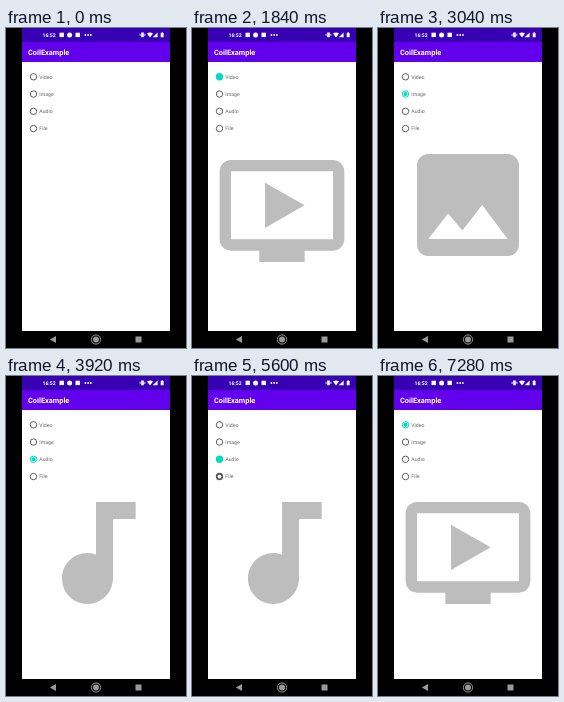
These frames come from a looping animation (180x320 px, 8640 ms). An HTML page:

```html
<!DOCTYPE html>
<html lang="en">
<head>
<meta charset="utf-8">
<title>CoilExample</title>
<style>
  html, body { margin: 0; width: 100%; height: 100%; overflow: hidden; background: #000; }
  svg { display: block; width: 100vw; height: 100vh; }
  text { font-family: Roboto, Arial, sans-serif; text-rendering: geometricPrecision; }
</style>
</head>
<body>
<svg viewBox="0 0 180 320">
  <rect width="180" height="320"/>
  <rect x="16" width="148" height="303" fill="#fff"/>
  <rect x="16" width="148" height="14" fill="#3700b3"/>
  <rect x="16" y="14" width="148" height="20" fill="#6200ee"/>
  <g fill="#fff">
    <text x="36.5" y="8.9" font-size="5.1" font-weight="700">16:52</text>
    <rect x="53.5" y="4.7" width="4.4" height="4.4"/>
    <circle cx="63.6" cy="6.9" r="2.5"/>
    <rect x="69.5" y="4.7" width="4.4" height="4.4"/>
    <circle cx="79.4" cy="7" r=".9"/>
    <circle cx="82.1" cy="7" r=".9"/>
    <circle cx="84.8" cy="7" r=".9"/>
    <path d="M135.2 4.6h2.6v4.6h-2.6zM133.7 5.8h.8v2.2h-.8zM138.5 5.8h.8v2.2h-.8z"/>
    <path d="M141 5.6q3-2.2 6 0l-3 3.8zM151.6 4.4v4.9h-4.9z"/>
    <path d="M154.7 4.9h.8v-.6h1.3v.6h.8v4.4h-2.9z"/>
    <text x="22" y="27.1" font-size="7.4" font-weight="700">CoilExample</text>
  </g>
  <path id="icon" fill="#bdbdbd" fill-rule="evenodd"/>
  <g id="rows"></g>
  <circle id="ripple" cx="27.5" r="6.5" fill="#000" fill-opacity=".08"/>
  <circle id="touch" cx="42" r="4" fill="#fff" fill-opacity=".5" stroke="#777" stroke-opacity=".35" stroke-width=".7"/>
  <g fill="#999">
    <path d="M50 308v7l-6.2-3.5z"/>
    <circle cx="90" cy="311.5" r="4.6" fill="none" stroke="#999" stroke-width="1"/>
    <circle cx="90" cy="311.5" r="3"/>
    <rect x="129.5" y="308.5" width="6" height="6"/>
  </g>
</svg>
<script>
const LOOP = 8640, STEP = 80, TEAL = '#03dac5', GRAY = '#5c5c5c', RADIUS = 3.7;
const labels = ['Video', 'Image', 'Audio', 'File'];
const shapes = [
  'M21 3H3c-1.11 0-2 .89-2 2v12c0 1.1.89 2 2 2h5v2h8v-2h5c1.1 0 2-.9 2-2V5c0-1.11-.9-2-2-2zM21 17H3V5h18zM16 11l-7 4V7z',
  'M21 19V5c0-1.1-.9-2-2-2H5c-1.1 0-2 .9-2 2v14c0 1.1.9 2 2 2h14c1.1 0 2-.9 2-2zM8.5 13.5l2.5 3L14.5 12l4.5 6H5z',
  'M12 3v9.28c-.47-.17-.97-.28-1.5-.28C8 12 6 14 6 16.5S8 21 10.5 21c2.31 0 4.2-1.75 4.45-4H15V6h4V3z',
  'M6 2c-1.1 0-2 .9-2 2v16c0 1.1.9 2 2 2h12c1.1 0 2-.9 2-2V8l-6-6zM13 9V3.5L18.5 9z'
];
// Each tap: press time, settle time, row, vertical shift of the icon
const taps = [
  [1360, 2000, 0, 6], [2560, 3040, 1, 0], [3440, 3920, 2, 0], [4400, 4800, 3, 6],
  [5280, 5760, 2, 0], [5920, 6320, 1, 0], [6480, 6960, 0, 0]
];
const SWITCH = 240;

const byId = id => document.getElementById(id);
const set = (el, attrs) => {
  for (const key in attrs) el.setAttribute(key, attrs[key]);
  return el;
};
const add = (name, attrs) => byId('rows').appendChild(
  set(document.createElementNS('http://www.w3.org/2000/svg', name), attrs));
const rowY = i => 48.8 + 17.25 * i;
const show = (el, on) => set(el, { visibility: on ? 'visible' : 'hidden' });

const radios = labels.map((label, i) => {
  const at = { cx: 27.5, cy: rowY(i) };
  add('text', { x: 33.3, y: rowY(i) + 1.9, 'font-size': 5.2, fill: '#666' }).textContent = label;
  return { ring: add('circle', { ...at, fill: 'none' }), dot: add('circle', at) };
});

function drawRadio({ ring, dot }, color, width, dotSize) {
  set(ring, { r: RADIUS - width / 2, stroke: color, 'stroke-width': width });
  set(dot, { r: dotSize, fill: color });
}

function draw(time) {
  const t = Math.floor(time % LOOP / STEP) * STEP;
  const done = taps.filter(tap => t >= tap[1] - SWITCH);
  const tap = done[done.length - 1], before = done[done.length - 2];
  const p = tap ? Math.min(1, (t - tap[1] + SWITCH) / SWITCH) : 1;

  radios.forEach((radio, i) => {
    if (tap && i === tap[2]) {
      // The ring fills up, then opens around the dot
      const width = p < 1 / 3 ? 1 + 6 * p : 1 + 2.7 * (1 - p) * 1.5;
      drawRadio(radio, TEAL, width, p < 1 / 3 ? 0 : 2.1);
    } else if (before && i === before[2]) {
      drawRadio(radio, GRAY, 1 + 1.2 * (1 - p), p < 1 / 3 ? 2.1 : 0);
    } else {
      drawRadio(radio, GRAY, 1, 0);
    }
  });

  show(byId('icon'), tap);
  if (tap) set(byId('icon'), {
    d: shapes[tap[2]],
    transform: `translate(22 ${109 + tap[3]}) scale(${17 / 3})`
  });

  const press = taps.find(([start, end]) => t >= start && t < end - SWITCH + STEP);
  show(byId('touch'), press && t < press[1] - SWITCH);
  show(byId('ripple'), press && t >= press[1] - SWITCH - STEP);
  if (press) {
    set(byId('touch'), { cy: rowY(press[2]) + 2.8 });
    set(byId('ripple'), { cy: rowY(press[2]) });
  }
}

const origin = performance.now();
function tick() {
  draw(performance.now() - origin);
  requestAnimationFrame(tick);
}
tick();
</script>
</body>
</html>
```
